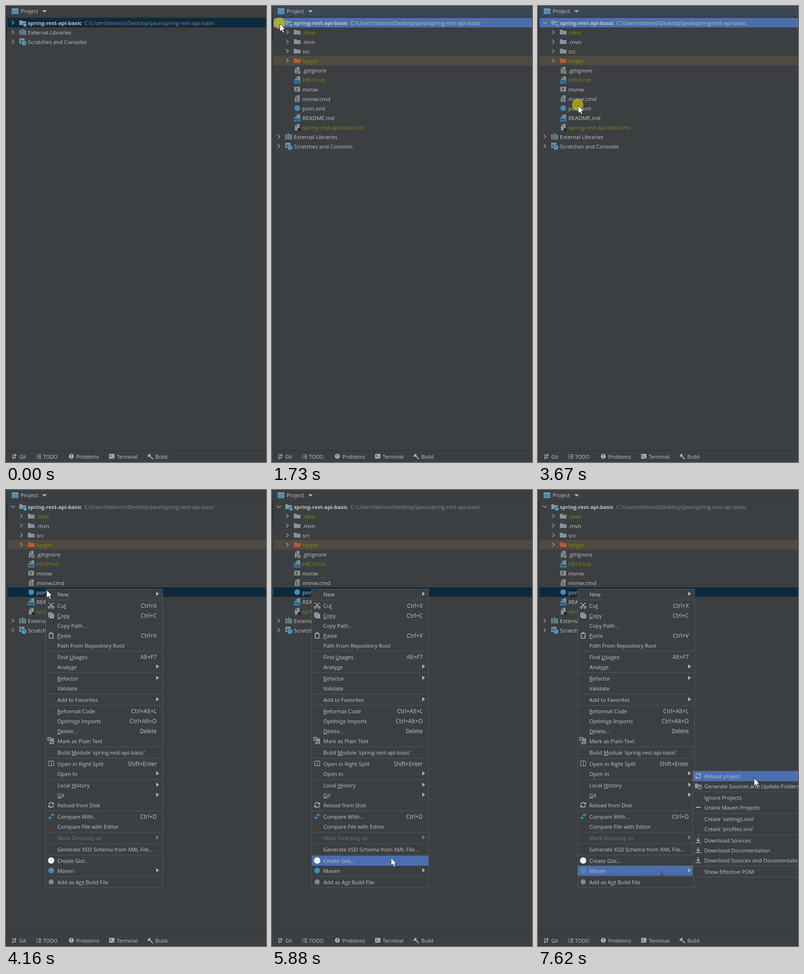
Recreate the animation shown at these times as an HTML page. Size 547 px wide and 960 px high, loop 8 s.

```html
<!DOCTYPE html>
<html lang="en">
<head>
<meta charset="utf-8">
<title>Project tree</title>
<style>
html, body { margin: 0; width: 100%; height: 100%; overflow: hidden; background: #3c3f41; }
svg { display: block; }
text { font: 11.3px "Open Sans", "Noto Sans", sans-serif; fill: #c4c4c4; }
#files text { font-size: 11.6px; }
.end { text-anchor: end; font-size: 11.8px; }
.foot { font-size: 10.8px; }
.bold { font-weight: 700; font-size: 11.2px; }
.path { font-size: 11.5px; }
.ignored { fill: #888806; }
.disabled { fill: #777; }
.key { text-decoration: underline; }
</style>
</head>
<body>
<svg id="stage" width="547" height="960" viewBox="0 0 547 960"></svg>
<script>
const LOOP = 8000, ROW = 21, GAP = 3;
const GRAY = '#afb1b3', STEEL = '#87939a', BLUE = '#3d8fb8', CYAN = '#40a8d4', BG = '#3c3f41';
const stage = document.getElementById('stage');

const rect = (x, y, w, h, fill, extra = '') =>
  `<rect x="${x}" y="${y}" width="${w}" height="${h}" fill="${fill}" ${extra}/>`;
const fill = (d, color, extra = '') => `<path d="${d}" fill="${color}" ${extra}/>`;
const line = (d, color, width = 1.5) => `<path d="${d}" fill="none" stroke="${color}" stroke-width="${width}"/>`;
const dot = (x, y, r, color, extra = '') => `<circle cx="${x}" cy="${y}" r="${r}" fill="${color}" ${extra}/>`;
const text = (x, y, s, cls = '') => `<text x="${x}" y="${y}" class="${cls}">${s}</text>`;
const at = (x, y, body) => `<g transform="translate(${x} ${y})">${body}</g>`;
const group = (id, body) => `<g id="${id}">${body}</g>`;
const mnemonic = s => s.replace(/_(.)/, '<tspan class="key">$1</tspan>');

// Icons are centred on 0,0.
const folder = color => fill('M-7-5h5l2 2h7V5H-7Z', color);
const page = fill('M0-7h5V7H-5V-2H0Z', STEEL) + fill('M-1-7v4h-4Z', STEEL);
const reload = line('M-5-1A5 5 0 0 1 4-3M5 1A5 5 0 0 1-4 3', GRAY, 1.7) +
  fill('M6-6v5H1ZM-6 6V1h5Z', GRAY);
const download = line('M0-6V2M-3.5-1L0 2.5 3.5-1M-6 5.5H6', GRAY, 1.6);
const icons = {
  folder: folder(STEEL),
  target: folder('#b35c33'),
  module: folder(STEEL) + rect(1, 1, 7, 7, BG) + rect(2, 2, 6, 6, CYAN),
  libs: rect(-7, -5, 2, 11, STEEL) + rect(-4, -5, 2, 11, '#62935a') + rect(-1, -7, 2, 13, STEEL) +
    rect(2, -5, 2, 11, CYAN) + rect(5, -4, 2, 10, STEEL),
  scratch: fill('M-7-7H4V4H-7Z', STEEL) + line('M-5-4l3 2.5-3 2.5', BG) +
    dot(3, 3, 6, BG) + dot(3, 3, 5, CYAN) + line('M3 0V3.5L5 5', BG, 1.2),
  ignore: page + dot(3, 4, 5, BG) + `<circle cx="3" cy="4" r="3.3" fill="none" stroke="${GRAY}" stroke-width="1.2"/>` +
    line('M1 2l4 4', GRAY, 1.2),
  md: fill('M1-7h5V0H-4V-2H1Z', STEEL) + fill('M0-7v4h-4Z', STEEL) + rect(-7, 0, 14, 8, BLUE) +
    line('M-5 6.5V2l2 3 2-3V6.5M1.5 2v4.5q4 0 4-2.2t-4-2.3', '#243b48', 1.1),
  shell: rect(-6, -5, 12, 10, STEEL) + line('M-3-3L1 0-3 3', BG, 1.6),
  doc: page + line('M-3 0H3M-3 2.5H3M-3 5H3', BG, 1),
  iml: page + rect(1, 2, 6, 6, BG) + rect(2, 3, 5, 5, '#222'),
  maven: dot(0, 0, 6, BLUE),
  cut: line('M-5-6L3 3M5-6L-3 3', GRAY, 1.5) +
    `<g fill="none" stroke="${GRAY}" stroke-width="1.5"><circle cx="-4" cy="4" r="2"/><circle cx="4" cy="4" r="2"/></g>`,
  copy: line('M-5 4V-5H3', GRAY, 2) + fill('M-3-3H6V6H-3Z', GRAY) + line('M-1 0H4M-1 3H4', BG, 1),
  paste: line('M-4-4H4V6H-4Z', GRAY, 1.7) + rect(-2, -6.5, 4, 3, GRAY),
  plain: fill('M-1-5H6V7H-4V2H-1Z', STEEL) + rect(-8, -8, 8, 8, STEEL) + line('M-6-6l4 4M-2-6l-4 4', BG, 1.2) +
    line('M-2 2H4M-2 4.5H4', BG, 1),
  split: line('M-5.5-5.5H5.5V4.5H-5.5ZM.5-5.5V4.5', GRAY, 1),
  reload,
  compare: line('M-7 3H0M0-3H7', CYAN, 1.7) + fill('M-3-1L1 3-3 7ZM3-7L-1-3 3 1Z', BLUE),
  gist: dot(0, 0, 6.7, '#f0f0f0'),
  ant: dot(0, 0, 5.5, '#858789'),
  sources: folder(STEEL) + rect(0, 0, 8, 8, BG) + `<g transform="translate(4 4) scale(.6)">${reload}</g>`,
  minus: rect(-5, -1, 10, 2, GRAY),
  download
};
const icon = (name, x, y) => name ? at(x, y, icons[name]) : '';

const chevron = (x, y) => line(`M${x - 2} ${y - 4.5}l4.5 4-4.5 4`, '#a6a8aa', 1.3);

function treeRow(mid, x, name, label, cls = '', open = false) {
  return (open ? chevron(x - 21, mid + .5) : '') + icon(name, x, mid) + text(x + 11, mid + 5, label, cls);
}

const files = [
  ['folder', '.idea', 'ignored', true], ['folder', '.mvn', '', true], ['folder', 'src', '', true],
  ['target', 'target', 'ignored', true], ['ignore', '.gitignore'], ['md', 'HELP.md', 'ignored'],
  ['shell', 'mvnw'], ['doc', 'mvnw.cmd'], ['maven', 'pom.xml'], ['md', 'README.md'],
  ['iml', 'spring-rest-api-basic.iml', 'ignored']
];

// Entries: label | shortcut, '>' or '!' (disabled, with arrow) | icon; '-' separates.
const mainItems = `New|>
-
Cu_t|Ctrl+X|cut
_Copy|Ctrl+C|copy
Copy Path...
_Paste|Ctrl+V|paste
Path From Repository Root
-
Find _Usages|Alt+F7
Analy_ze|>
-
_Refactor|>
Validate
-
Add to Favorites|>
-
_Reformat Code|Ctrl+Alt+L
Optimi_ze Imports|Ctrl+Alt+O
_Delete...|Delete
Mark as Plain Text||plain
-
Build _Module 'spring-rest-api-basic'
-
Open in Right Split|Shift+Enter|split
Open In|>
-
Local _History|>
_Git|>
Reload from Disk||reload
-
Compare With...|Ctrl+D|compare
Compare File with Editor
-
Mark Directory as|!
-
Generate XSD Schema from XML File...
-
Create Gist...||gist
Maven|>|maven
-
Add as A_nt Build File||ant`;
const newItems = `File
Scratch File
Directory
-
HTML File
Stylesheet
JavaScript File
TypeScript File
XML File
Resource Bundle`;
const mavenItems = `Reload project||reload
Generate Sources and Update Folders||sources
-
Ignore Projects
Unlink Maven Projects||minus
-
Create 'settings.xml'
Create 'profiles.xml'
-
Download Sources||download
Download Documentation||download
Download Sources and Documentation||download
-
Show Effective POM`;

function buildMenu(id, x, top, width, spec) {
  const rows = [];
  let y = top, lines = '', body = '';
  for (const entry of spec.split('\n')) {
    if (entry === '-') {
      lines += rect(x, y + 1, width, 1, '#515355');
      y += GAP;
      continue;
    }
    const [label, side = '', name] = entry.split('|');
    const off = side === '!', mid = y + 10;
    body += icon(name, x + 11, mid) + text(x + 24, y + 15, mnemonic(label), off ? 'disabled' : '');
    if (off || side === '>') body += fill(`M${x + width - 13} ${mid - 5}l6 4.5-6 4.5Z`, off ? '#777' : GRAY);
    else if (side) body += text(x + width - 12, y + 15, side, 'end');
    if (!off) rows.push(y);
    y += ROW;
  }
  const frame = rect(x - .5, top - .5, width + 1, y - top + 1, BG, 'stroke="#555759"');
  const bar = rect(x, top, width, ROW, '#4b6eaf', `id="${id}Bar"`);
  return { rows, svg: group(id, frame + lines + bar + body) };
}

const menus = {
  main: buildMenu('main', 84, 209, 245, mainItems),
  fresh: buildMenu('fresh', 327, 207, 260, newItems),
  maven: buildMenu('maven', 326, 592, 260, mavenItems)
};
const MAVEN_ROW = 791, NEW_ROW = 209;

const header = rect(3, 0, 544, 23, BG, 'id="header"') +
  rect(26, 1, 65, 20, '#4c5052', 'id="titleHover" rx="3"') +
  rect(12.5, 5.5, 13, 11, BLUE, `stroke="${STEEL}"`) + rect(12, 5, 14, 3, STEEL) +
  text(31, 15, 'Project') + fill('M76 9h10l-5 5Z', GRAY) + rect(0, 23, 547, 1, '#323436');

const footer = rect(0, 936, 547, 1, '#2f3133') +
  line('M14.5 943V954M14.5 951.5H19.5V945', GRAY) + fill('M16.5 946.5l3-4 3 4Z', GRAY) +
  line('M64 945h2M68 945h6M64 948.5h2M68 948.5h6M64 952h2M68 952h6', GRAY, 1.6) +
  dot(137.5, 948, 5.2, GRAY) + rect(136.7, 944.5, 1.7, 4, BG) + rect(136.7, 950, 1.7, 1.7, BG) +
  rect(217, 943, 11, 10, GRAY) + line('M219 945l3 2.5-3 2.5M223 951h4', BG, 1.2) +
  line('M301 946l8 8', GRAY, 2.2) + line('M298.5 948.5l5-5', GRAY, 3.5) +
  [[28, 'Git'], [78, 'TODO'], [148, 'Problems'], [233, 'Terminal'], [314, 'Build']]
    .map(([x, s]) => text(x, 953, s, 'foot')).join('');

const arrow = 'M.5.5V17L4.3 13.5 7 19.5 9.7 18.3 7.1 12.6H12Z';

stage.innerHTML = rect(0, 0, 547, 960, BG) + rect(0, 24, 2, 44, '#2b2d2f') + rect(2, 0, 1, 936, '#323436') +
  header +
  group('targetRow', rect(3, 105, 544, 20, '#4f4b41')) +
  rect(3, 25, 544, 20, '#0d293e', 'id="selection"') +
  group('closed', chevron(14, 35.5)) + group('opened', line('M10 33l4.5 4 4.5-4', '#a6a8aa', 1.3)) +
  treeRow(35, 35, 'module', 'spring-rest-api-basic', 'bold') +
  '<text id="path" class="path" x="165" y="40">C:\\Users\\tebnos\\Desktop\\Java\\spring-rest-api-basic</text>' +
  group('files', files.map(([name, label, cls, open], i) =>
    treeRow(55 + i * 20, 53, name, label, cls, open)).join('')) +
  group('roots', treeRow(55, 35, 'libs', 'External Libraries', '', true) +
    treeRow(75, 35, 'scratch', 'Scratches and Consoles', '', true)) +
  footer + menus.main.svg + menus.fresh.svg + menus.maven.svg +
  group('ghost', at(257, 800, fill(arrow, '#333537', 'opacity=".35"'))) +
  dot(0, 0, 12, '#dcd000', 'id="click" opacity=".62"') +
  group('cursor', fill(arrow, '#fff', 'stroke="#111" stroke-width=".8"'));

const el = {};
stage.querySelectorAll('[id]').forEach(node => el[node.id] = node);
const set = (node, attrs) => { for (const k in attrs) node.setAttribute(k, attrs[k]); };
const show = (node, on) => node.setAttribute('display', on ? 'inline' : 'none');

const ease = {
  in: u => u * u,
  out: u => 1 - (1 - u) ** 3,
  both: u => u * u * (3 - 2 * u)
};
// start, end, x, y, easing
const moves = [
  [50, 770, 85, 12, 'out'], [860, 1120, 39, 38, 'both'], [1290, 1440, 16, 37, 'both'],
  [1950, 2420, 121, 227, 'both'], [2590, 3370, 81, 205, 'both'], [3420, 3470, 84, 209, 'both'],
  [3900, 3960, 85, 210, 'both'], [4160, 4910, 195, 220, 'both'], [5080, 5360, 193, 305, 'in'],
  [5360, 5880, 250, 774, 'out'], [5900, 6060, 257, 800, 'out'],
  [6720, 6880, 429, 779, 'in'], [6880, 7520, 457, 608, 'out'], [7540, 7620, 454, 606, 'both']
];

function pointer(t) {
  let x = 546, y = 848;
  for (const [start, end, toX, toY, kind] of moves) {
    if (t <= start) break;
    const k = ease[kind](Math.min(1, (t - start) / (end - start)));
    x += (toX - x) * k;
    y += (toY - y) * k;
  }
  return { x, y };
}

const rowAt = (menu, y) => menu.rows.find(top => y >= top && y < top + ROW);

function placeBar(bar, top) {
  show(bar, top !== undefined);
  if (top !== undefined) bar.setAttribute('y', top);
}

function render(t) {
  const p = pointer(t), late = pointer(t - 80);
  const expanded = t >= 1630, popup = t >= 3910, focused = expanded && !popup;
  const pomSelected = t >= 3760, mavenOpen = t >= 6230;

  el.header.setAttribute('fill', focused ? '#3b4754' : BG);
  show(el.titleHover, t > 50 && p.y < 22 && p.x > 26 && p.x < 91);
  set(el.selection, { y: pomSelected ? 205 : 25, fill: focused ? '#4b6eaf' : '#0d293e' });
  el.path.style.fill = focused && !pomSelected ? '#b9c2d1' : '#8a8c8e';
  show(el.closed, !expanded);
  for (const node of [el.opened, el.files, el.targetRow]) show(node, expanded);
  el.roots.setAttribute('transform', `translate(0 ${expanded ? 220 : 0})`);

  const hovered = t < 4220 ? undefined : mavenOpen ? MAVEN_ROW : rowAt(menus.main, late.y);
  show(el.main, popup);
  placeBar(el.mainBar, hovered);
  show(el.fresh, t >= 4550 && hovered === NEW_ROW);
  placeBar(el.freshBar);
  show(el.maven, mavenOpen);
  placeBar(el.mavenBar, p.x > 326 ? rowAt(menus.maven, p.y) : undefined);

  show(el.ghost, t >= 6500);
  show(el.click, (t >= 1580 && t < 1780) || (t >= 3650 && t < 3860));
  set(el.click, { cx: p.x - .5, cy: p.y - 1 });
  show(el.cursor, t >= 50);
  el.cursor.setAttribute('transform', `translate(${p.x} ${p.y})`);
}

const began = performance.now();
function tick() {
  render((performance.now() - began) % LOOP);
  requestAnimationFrame(tick);
}
tick();
</script>
</body>
</html>
```
